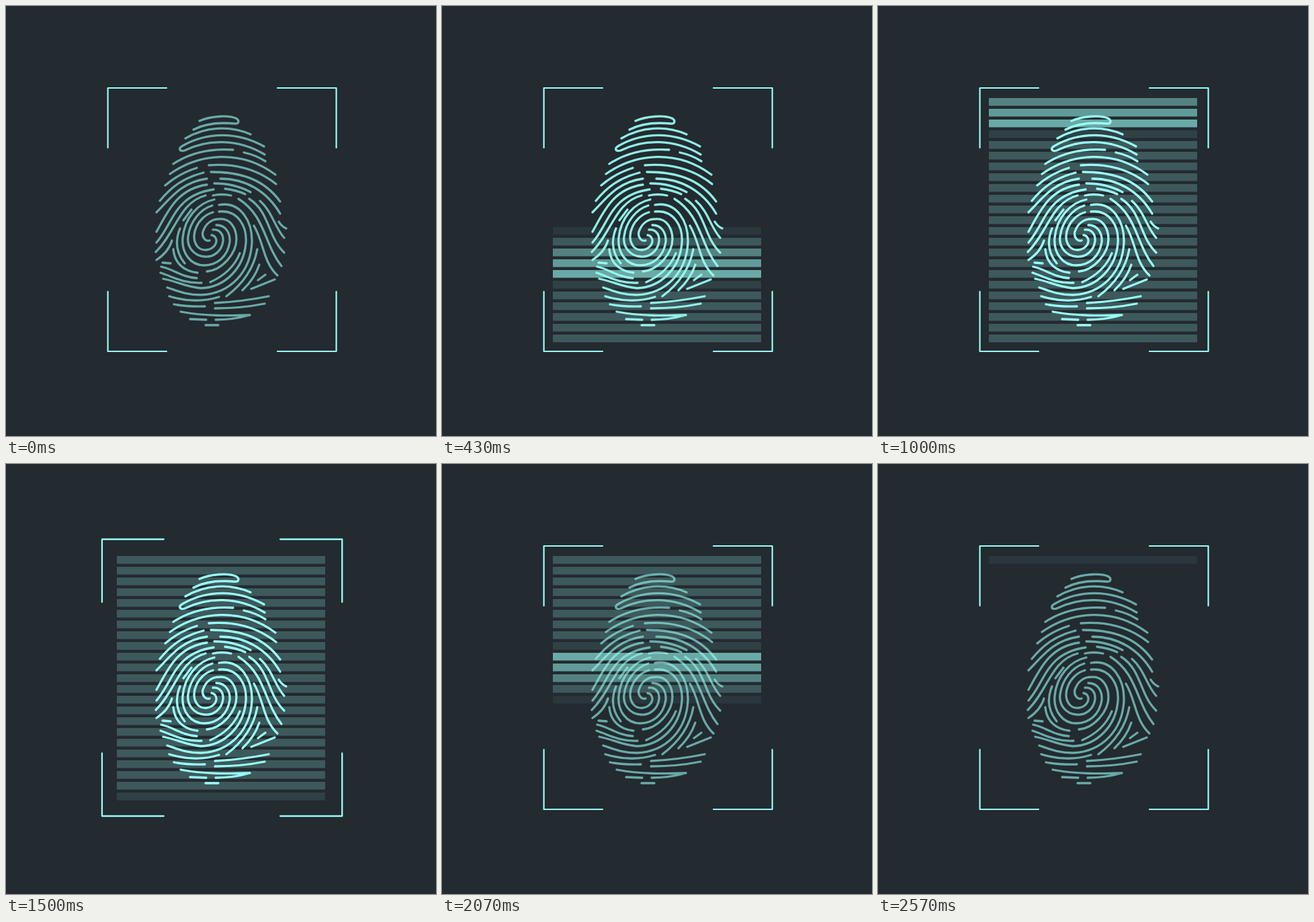
An HTML page that plays this animation: 640 by 640 pixels, repeating every 2.71 s.

```html
<!DOCTYPE html>
<html lang="en">
<head>
<meta charset="utf-8">
<title>Fingerprint scan</title>
<style>
html, body { margin: 0; width: 100%; height: 100%; overflow: hidden; background: #232a30; }
svg { display: block; width: 100vw; height: 100vh; }
path { fill: none; stroke: #99fff6; stroke-linecap: round; stroke-linejoin: round; }
#print { stroke-width: 3.3; }
#frame { stroke-width: 2.2; }
rect { fill: #99fff6; }
</style>
</head>
<body>
<svg viewBox="0 0 640 640">
  <g id="bars"></g>
  <g id="print">
    <!-- upper arches -->
    <path d="M288 171C304 164 330 162 342 167C348 170 347 176 340 175C318 173 298 174 279 184
      M267 197C296 180 332 177 364 191
      M384 209C345 187 300 187 263 208C256 212 258 217 266 215C300 198 345 197 385 221
      M249 235C276 217 307 212 338 214M354 218Q372 222 386 231
      M244 250C288 219 350 213 401 251
      M237 267Q258 249 284 241M302 237C340 234 373 242 402 265
      M229 290C247 268 266 255 294 248M305 247C350 247 384 258 408 291
      M319 257C356 257 388 275 408 309
      M310 264Q340 264 364 277M326 272Q343 274 356 280
      M308 282Q321 279 335 282"/>
    <!-- right flank -->
    <path d="M378 290C397 307 399 328 414 345M406 321Q410 328 417 331
      M362 287C393 307 389 343 414 367
      M346 287C386 312 384 354 410 387
      M369 327C384 352 382 380 404 401
      M375 408L386 400M365 421L400 407
      M352 423Q370 406 377 385M328 432C352 414 369 390 374 362"/>
    <!-- left flank -->
    <path d="M224 307C241 291 259 262 299 257
      M224 336C240 308 254 272 299 266
      M224 352C250 322 250 282 309 273
      M223 366C252 338 258 292 297 282
      M224 378Q242 366 247 349M276 303L264 319
      M259 331C251 350 254 368 266 383"/>
    <!-- whorl: four arms winding outwards, then their outer turns -->
    <path d="M303 349C297 351 291 344 293 336C297 324 306 317 318 317C335 316 343 332 343 347C343 368 322 393 299 395
      M306 341C313 342 315 350 311 356C305 364 292 366 285 358C272 342 286 313 308 307
      M308 333C318 332 324 340 323 350C321 366 308 374 296 373C279 372 269 358 271 343C274 320 290 302 307 297
      M313 326C327 326 334 338 333 351C330 373 314 386 295 386C275 386 261 368 263 345C266 315 286 293 310 288
      M317 306C345 303 359 328 357 353C354 390 326 419 290 420C267 418 255 410 234 406
      M317 296C350 290 367 322 366 352C364 395 335 428 290 430C268 430 255 424 240 419
      M348 368C340 388 324 402 304 411"/>
    <!-- lower arches -->
    <path d="M249 362C251 384 266 395 285 397M233 382L245 383
      M231 388C248 391 262 404 284 405M230 397C249 403 262 413 291 412
      M243 432Q282 444 317 433M250 444Q270 448 296 447
      M311 442Q351 440 391 432M311 450Q350 450 385 443
      M260 455C298 462 332 461 363 460
      M274 466L298 467M312 467Q338 467 363 460M297 475H316"/>
  </g>
  <path id="frame" d="M239 122H151.6V211M404 122H491.6V211M151.6 425V514H239M404 514H491.6V425"/>
</svg>
<script>
const LOOP = 2710, FPS = 14, LAST = 36, BACK = 1500, COUNT = 23;
const REST = 0.22;
const LEVELS = [0.06, REST, 0.41, 0.53, 0.6, 0.11];
const byId = id => document.getElementById(id);
const print = byId("print"), frame = byId("frame");
const clamp = x => Math.max(0, Math.min(1, x));
const ramp = (t, from, to) => clamp((t - from) / (to - from));

const bars = Array.from({ length: COUNT }, (_, k) => {
  const bar = document.createElementNS("http://www.w3.org/2000/svg", "rect");
  const box = { x: 165, y: 137 + 16 * k, width: 310, height: 11.5 };
  for (const name in box) bar.setAttribute(name, box[name]);
  byId("bars").append(bar);
  return bar;
});

function draw(time) {
  const step = Math.min(LAST, Math.floor((time % LOOP + 5) * FPS / 1000));
  const t = step * 1000 / FPS;
  const back = t >= BACK;
  // the scan climbs one bar every 40 ms, filling first and clearing second
  const head = back ? Math.round((t - BACK) / 40) : Math.floor((t - 4) / 40);
  bars.forEach((bar, k) => {
    const age = back ? COUNT + 4 - head - k : k - COUNT + 1 + head;
    bar.setAttribute("opacity", age < 0 ? 0 : LEVELS[age] ?? REST);
  });

  const glow = back ? 1 - ramp(t, 1700, 2000) : ramp(t, 0, 540);
  print.setAttribute("opacity", 0.6 + 0.4 * glow);

  const age = t - (back ? BACK : 1000 / FPS);
  const pulse = age > -1 ? 1 - ramp(age, 0, 143) : 0;
  frame.setAttribute("transform",
    `translate(321.6 317.8) scale(${1 + 0.051 * pulse}) translate(-321.6 -317.8)`);
}

const start = performance.now();
function tick() {
  draw(performance.now() - start);
  requestAnimationFrame(tick);
}
tick();
</script>
</body>
</html>
```
